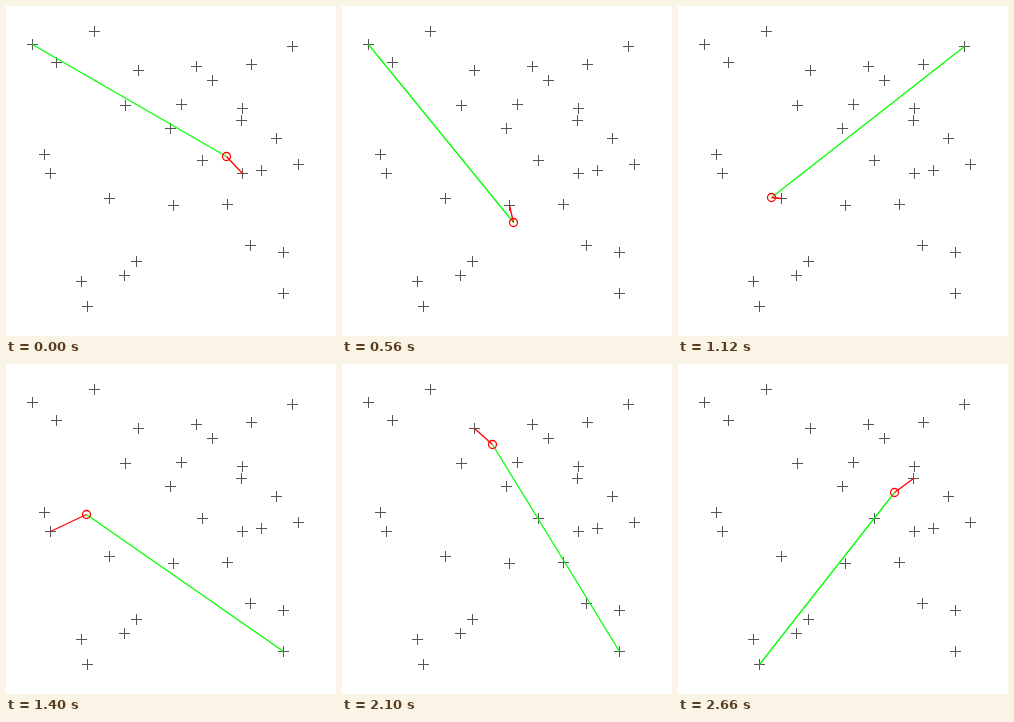
Recreate the animation shown at these times as an HTML page. Size 330 by 330 pixels, loop 2.8 s.

```html
<!DOCTYPE html>
<html lang="en">
<head>
<meta charset="utf-8">
<title>Nearest and farthest point</title>
<style>
  html, body { margin: 0; width: 100%; height: 100%; overflow: hidden; background: #fff; }
  svg { display: block; width: 330px; height: 330px; fill: none; }
  .cross { stroke: #555; stroke-width: 1; shape-rendering: crispEdges; }
  .far { stroke: #0f0; }
  .near, .probe { stroke: #f00; }
  .far, .near, .probe { stroke-width: 1.3; }
</style>
</head>
<body>
<svg viewBox="0 0 330 330">
  <g transform="translate(.5 .5)">
    <path class="cross" id="crosses"/>
    <line class="far" id="far"/>
    <line class="near" id="near"/>
    <circle class="probe" id="probe" r="4"/>
  </g>
</svg>
<script>
const STEPS = 20, STEP_MS = 140, CENTER = 150, RADIUS = 70;

const points = [
  [26, 38], [88, 25], [50, 56], [132, 64], [119, 99], [190, 60],
  [206, 74], [175, 98], [245, 58], [286, 40], [236, 102], [235, 114],
  [164, 122], [270, 132], [196, 154], [236, 167], [255, 164], [292, 158],
  [38, 148], [44, 167], [103, 192], [167, 199], [221, 198], [244, 239],
  [277, 246], [277, 287], [130, 255], [118, 269], [75, 275], [81, 300]
];

const el = id => document.getElementById(id);
const setAttrs = (node, attrs) => {
  for (const key in attrs) node.setAttribute(key, attrs[key]);
};
const connect = (line, [x1, y1], [x2, y2]) => setAttrs(line, { x1, y1, x2, y2 });

el('crosses').setAttribute('d', points.map(([x, y]) =>
  `M${x - 5.5} ${y}h11M${x} ${y - 5.5}v11`).join(''));

// The probe circles the center, snapped down to whole pixels.
function probeAt(step) {
  const angle = step * 2 * Math.PI / STEPS;
  const snap = v => Math.floor(CENTER + RADIUS * v + 1e-6);
  return [snap(Math.cos(angle)), snap(Math.sin(angle))];
}

function draw(step) {
  const probe = probeAt(step);
  const distance = p => Math.hypot(p[0] - probe[0], p[1] - probe[1]);
  const sorted = [...points].sort((a, b) => distance(a) - distance(b));
  connect(el('near'), probe, sorted[0]);
  connect(el('far'), probe, sorted[sorted.length - 1]);
  setAttrs(el('probe'), { cx: probe[0], cy: probe[1] });
}

const start = performance.now();
let shown = -1;
function tick() {
  const step = Math.floor((performance.now() - start) / STEP_MS) % STEPS;
  if (step !== shown) draw(shown = step);
  requestAnimationFrame(tick);
}
tick();
</script>
</body>
</html>
```
